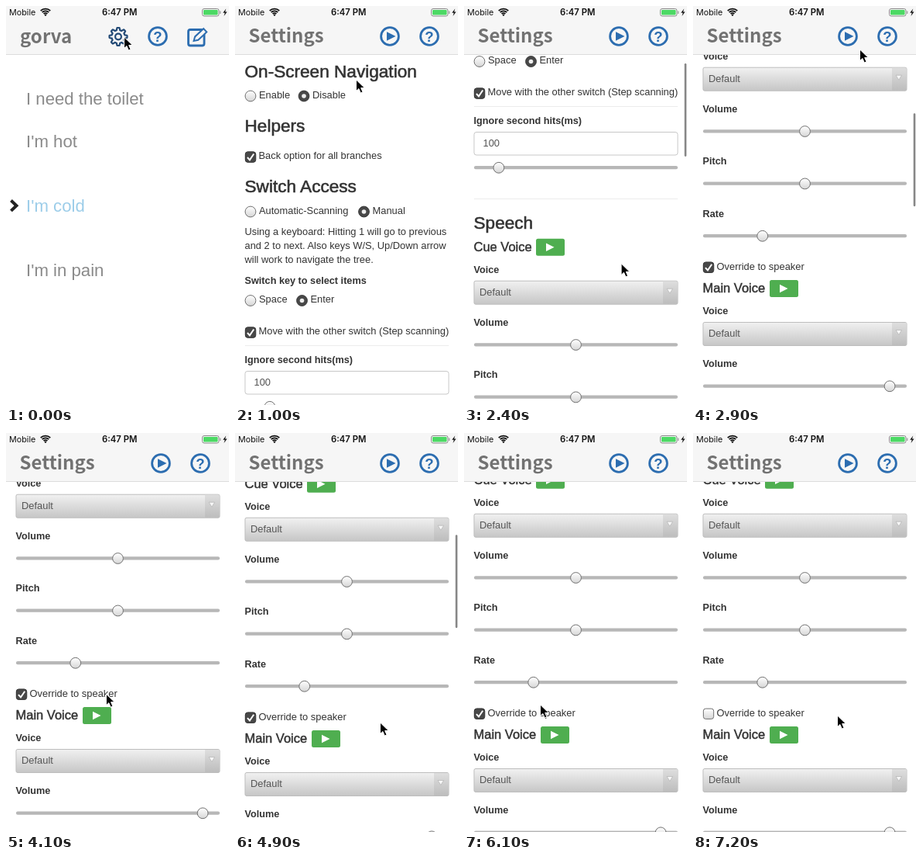
Write an HTML page that moves like this. It is 288 px wide and 514 px high and loops after 7300 ms.

```html
<!DOCTYPE html>
<html lang="en">
<head>
<meta charset="utf-8">
<title>Settings walkthrough</title>
<style>
  html, body { margin: 0; width: 100%; height: 100%; overflow: hidden; background: #fff; }
  svg { display: block; }
  text { font-family: "Liberation Sans", Arial, sans-serif; font-size: 12.9px; fill: #333; white-space: pre; }
  .label { font-size: 12.7px; font-weight: 700; }
  .h3 { font-size: 22.6px; stroke: #333; stroke-width: .6px; }
  .h4 { font-size: 16.5px; stroke: #333; stroke-width: .45px; }
  .field { fill: #555; }
  .item { font-size: 22.2px; fill: #8a8a8a; }
  .active { fill: #9ccde9; }
  .title { font: 700 24px "Noto Sans CJK JP", "Noto Sans CJK SC", "Open Sans", sans-serif; fill: #727272; }
  .status { font: 400 10.8px Inter, sans-serif; fill: #111; }
  .clock { font-weight: 600; font-size: 11.3px; }
  .icon { fill: none; stroke: #2c6db0; stroke-width: 2.8; }
  .mark { font: 700 18.5px "Liberation Sans", Arial, sans-serif; fill: #2c6db0; text-anchor: middle; }
  .on { fill: #484848; stroke: #3a3a3a; }
  .off { fill: url(#knob); stroke: #707070; }
</style>
</head>
<body>
<svg width="288" height="514" viewBox="0 0 288 514">
  <defs>
    <linearGradient id="knob" x2="0" y2="1"><stop stop-color="#fff"/><stop offset="1" stop-color="#d6d6d6"/></linearGradient>
    <linearGradient id="select" x2="0" y2="1"><stop stop-color="#f1f1f1"/><stop offset="1" stop-color="#c6c6c6"/></linearGradient>
    <linearGradient id="arrow" x2="0" y2="1"><stop stop-color="#dedede"/><stop offset="1" stop-color="#bdbdbd"/></linearGradient>
  </defs>
  <rect width="288" height="514" fill="#fff"/>
  <g id="home"></g>
  <g id="page"></g>
  <rect width="288" height="62" fill="#f6f6f6"/>
  <path d="M0 62.5H288" stroke="#dcdcdc"/>
  <g id="homeBar"></g>
  <g id="pageBar"></g>
  <g id="statusBar"></g>
  <rect id="scrollbar" x="284.7" width="2.6" height="120" rx="1.3" fill="#868686"/>
  <path id="cursor" d="M0 0V14.6L3.4 11.5L5.8 17L8.5 15.9L6.2 10.5H10.8Z" stroke="#fff" stroke-linejoin="round"/>
</svg>
<script>
const LOOP = 7300, STEP = 100, OPEN_AT = 400, UNCHECK_AT = 6700;
const LEFT = 13, WIDTH = 263;
const $ = id => document.getElementById(id);

// Every y below is the vertical middle of its row.
const text = (x, y, s, cls = "", drop = 3.8) => `<text x="${x}" y="${y + drop}" class="${cls}">${s}</text>`;
const label = (y, s) => text(LEFT - .5, y, s, "label");
const heading = (y, s) => text(LEFT - .5, y, s, "h3", 6.8);
const rule = y => `<path d="M${LEFT} ${y}h${WIDTH}" stroke="#ececec"/>`;
const triangle = (x, y, size, fill) =>
  `<path d="M${x} ${y - size / 2}v${size}l${size} ${-size / 2}Z" fill="${fill}"/>`;

const radio = (x, y, on, s) =>
  `<circle cx="${x}" cy="${y + 1}" r="6.9" class="${on ? "on" : "off"}"/>` +
  (on ? `<circle cx="${x}" cy="${y + 1}" r="2.8" fill="#eee"/>` : "") + text(x + 11, y, s);

function checkbox(y, s, id = "") {
  const box = cls => `<rect x="${LEFT + .4}" y="${y - 5.6}" width="13.3" height="13.3" rx="3" class="${cls}"/>`;
  return box("off") + `<g id="${id}">${box("on")}
    <path d="M16 ${y + 1.5}l3 3.3l5.3-7.8" fill="none" stroke="#fff" stroke-width="2"/></g>` + text(30.5, y, s);
}

const slider = (y, value) =>
  `<rect x="${LEFT}" y="${y - 2}" width="${WIDTH}" height="4.2" rx="2" fill="#b7b7b7"/>
   <circle cx="${LEFT + 7 + value * (WIDTH - 14)}" cy="${y + .3}" r="6.9" class="off"/>`;

const select = (y, s) =>
  `<rect x="${LEFT}" y="${y - 15}" width="${WIDTH}" height="30" rx="2" fill="url(#select)" stroke="#bdbdbd"/>
   <rect x="257" y="${y - 14.5}" width="18.5" height="29" fill="url(#arrow)"/>
   <path d="M262 ${y - 5}h7.5l-3.7 6Z" fill="#f7f7f7" stroke="#aaa" stroke-width=".6"/>` + text(20, y, s, "field");

function voice(y, name, buttonX, levels) {
  const rows = Object.entries(levels).map(([s, value], i) =>
    label(y + 97.3 + i * 67.4, s) + slider(y + 125.5 + i * 67.4, value));
  return text(LEFT - .5, y, name, "h4", 5.2) +
    `<rect x="${buttonX}" y="${y - 11}" width="37" height="22" rx="2.5" fill="#4fae50"/>` +
    triangle(buttonX + 13, y, 10.5, "#fff") +
    label(y + 29.5, "Voice") + select(y + 58.5, "Default") + rows.join("");
}

const disc = x => `<circle cx="${x}" cy="39" r="11.4" class="icon"/>`;
const help = x => disc(x) + text(x, 39, "?", "mark", 6.5);

function gear(cx, cy) {
  const points = Array.from({ length: 96 }, (_, i) => {
    const a = i / 96 * 2 * Math.PI;
    const r = 10 + 1.5 * Math.max(-1, Math.min(1, 2.5 * Math.cos(8 * a)));
    return [cx + r * Math.cos(a), cy + r * Math.sin(a)].map(v => v.toFixed(2));
  });
  return `<g fill="none" stroke="#234a76" stroke-width="2.2" stroke-linejoin="round">
    <polygon points="${points.join(" ")}"/><circle cx="${cx}" cy="${cy}" r="3.9"/></g>`;
}

const pencil = `<rect x="235.5" y="30.5" width="20.5" height="20.5" rx="2.5" class="icon"/>
  <g transform="translate(243 44.5) rotate(-43)" stroke="#f6f6f6" stroke-width="7"><path d="M0 0H22"/></g>
  <path transform="translate(242.5 45) rotate(-43)" d="M0 0L5-3H20V3H5Z" class="icon" style="stroke-width:2"/>`;

$("home").innerHTML =
  text(26, 119, "I need the toilet", "item", 7.7) + text(26, 174.5, "I'm hot", "item", 7.7) +
  text(26, 257.5, "I'm cold", "item active", 7.7) + text(26, 340, "I'm in pain", "item", 7.7) +
  `<path d="M6.5 250.5l7 6.7l-7 6.7" fill="none" stroke="#222" stroke-width="4"/>`;

$("homeBar").innerHTML = text(18, 39, "gorva", "title", 8.6) + gear(145, 39.5) + help(196) + pencil;
$("pageBar").innerHTML = text(17.5, 38.5, "Settings", "title", 8.6) +
  disc(200) + triangle(196, 39, 11.5, "#2c6db0") + help(251);

$("statusBar").innerHTML = text(4, 8, "Mobile", "status") + text(124, 8, "6:47 PM", "status clock") +
  [3.3, 6, 8.7].map(r => `<path d="M${51 - r * .72} ${12.5 - r * .72}A${r} ${r} 0 0 1 ${51 + r * .72} ${12.5 - r * .72}"
    fill="none" stroke="#111" stroke-width="1.8"/>`).join("") + `<circle cx="51" cy="11.6" r="1.2"/>
   <rect x="253.5" y="3.5" width="21.5" height="9.5" rx="2.5" fill="none" stroke="#8a8a8a"/>
   <rect x="255" y="5" width="18.5" height="6.5" rx="1.2" fill="#4cd964"/>
   <path d="M276.8 6.5v3.5" stroke="#8a8a8a"/>
   <path d="M284.2 3.5l-4 5.3h2.5l-1.2 4.2l4-5.5h-2.5Z" fill="#111"/>`;

const note = ["Using a keyboard: Hitting 1 will go to previous",
  "and 2 to next. Also keys W/S, Up/Down arrow", "will work to navigate the tree."];

$("page").innerHTML =
  heading(85, "On-Screen Navigation") + radio(20, 115, false, "Enable") + radio(89, 115, true, "Disable") +
  heading(155, "Helpers") + checkbox(193.5, "Back option for all branches") +
  heading(233, "Switch Access") + radio(20, 264, false, "Automatic-Scanning") + radio(166.5, 264, true, "Manual") +
  note.map((s, i) => text(LEFT - .5, 291 + 18 * i, s)).join("") +
  label(354, "Switch key to select items") + radio(20, 378.5, false, "Space") + radio(86.5, 378.5, true, "Enter") +
  checkbox(419.5, "Move with the other switch (Step scanning)") + rule(437.5) +
  label(456, "Ignore second hits(ms)") +
  `<rect x="${LEFT}" y="470.5" width="${WIDTH}" height="29.5" rx="3" fill="#fff" stroke="#c8c8c8"/>` +
  text(24.5, 485.5, "100", "field") + slider(516, .1) + rule(556.5) +
  heading(588.5, "Speech") +
  voice(618.7, "Cue Voice", 93, { Volume: .5, Pitch: .5, Rate: .28 }) +
  checkbox(918.7, "Override to speaker", "override") +
  voice(947, "Main Voice", 99, { Volume: .94, Pitch: .5, Rate: .28 });

// Eased progress from 0 to 1 between two times.
function ramp(t, from, to) {
  const p = Math.max(0, Math.min(1, (t - from) / (to - from)));
  return p * p * (3 - 2 * p);
}

const swipes = [
  { from: 1300, to: 1900, by: 240 },
  { from: 2200, to: 2900, by: 343 },
  { from: 4100, to: 4900, by: -30 },
  { from: 4900, to: 5300, by: 5 }];
const scrollAt = t => swipes.reduce((sum, s) => sum + s.by * ramp(t, s.from, s.to), 0);
const barAt = t => Math.max(...swipes.map(s => ramp(t, s.from, s.from + 100) - ramp(t, s.to, s.to + 300)));

// Pointer stops: arrival time, x, y. A move takes at most MOVE ms, then the pointer rests.
const MOVE = 700;
const stops = [
  [0, 152.5, 40], [1000, 156.5, 95], [1400, 191, 400], [1700, 192, 190], [2200, 200, 400], [2900, 215.5, 56],
  [3500, 250, 170], [3800, 126, 334], [4700, 187.5, 373], [6100, 98.5, 350], [6600, 18, 356],
  [7000, 110, 372], [7200, 186.5, 364]];

function pointerAt(t) {
  let [departed, x, y] = stops[0];
  for (const [arrive, nextX, nextY] of stops.slice(1)) {
    const p = ramp(t, Math.max(departed, arrive - MOVE), arrive);
    x += (nextX - x) * p;
    y += (nextY - y) * p;
    departed = arrive;
  }
  return [x, y];
}

const show = (id, on) => $(id).style.display = on ? "" : "none";
const start = performance.now();

function render(elapsed) {
  const t = Math.floor(elapsed % LOOP / STEP) * STEP;
  const opened = t >= OPEN_AT, scroll = scrollAt(t);
  for (const id of ["home", "homeBar"]) show(id, !opened);
  for (const id of ["page", "pageBar"]) show(id, opened);
  show("override", t < UNCHECK_AT);
  $("page").setAttribute("transform", `translate(0 ${-Math.round(scroll)})`);
  $("scrollbar").setAttribute("y", 2 + scroll * .2335);
  $("scrollbar").setAttribute("opacity", barAt(t));
  $("cursor").setAttribute("transform", `translate(${pointerAt(t)})`);
}

function tick(now) {
  render(Math.max(0, now - start));
  requestAnimationFrame(tick);
}
render(0);
requestAnimationFrame(tick);
</script>
</body>
</html>
```
